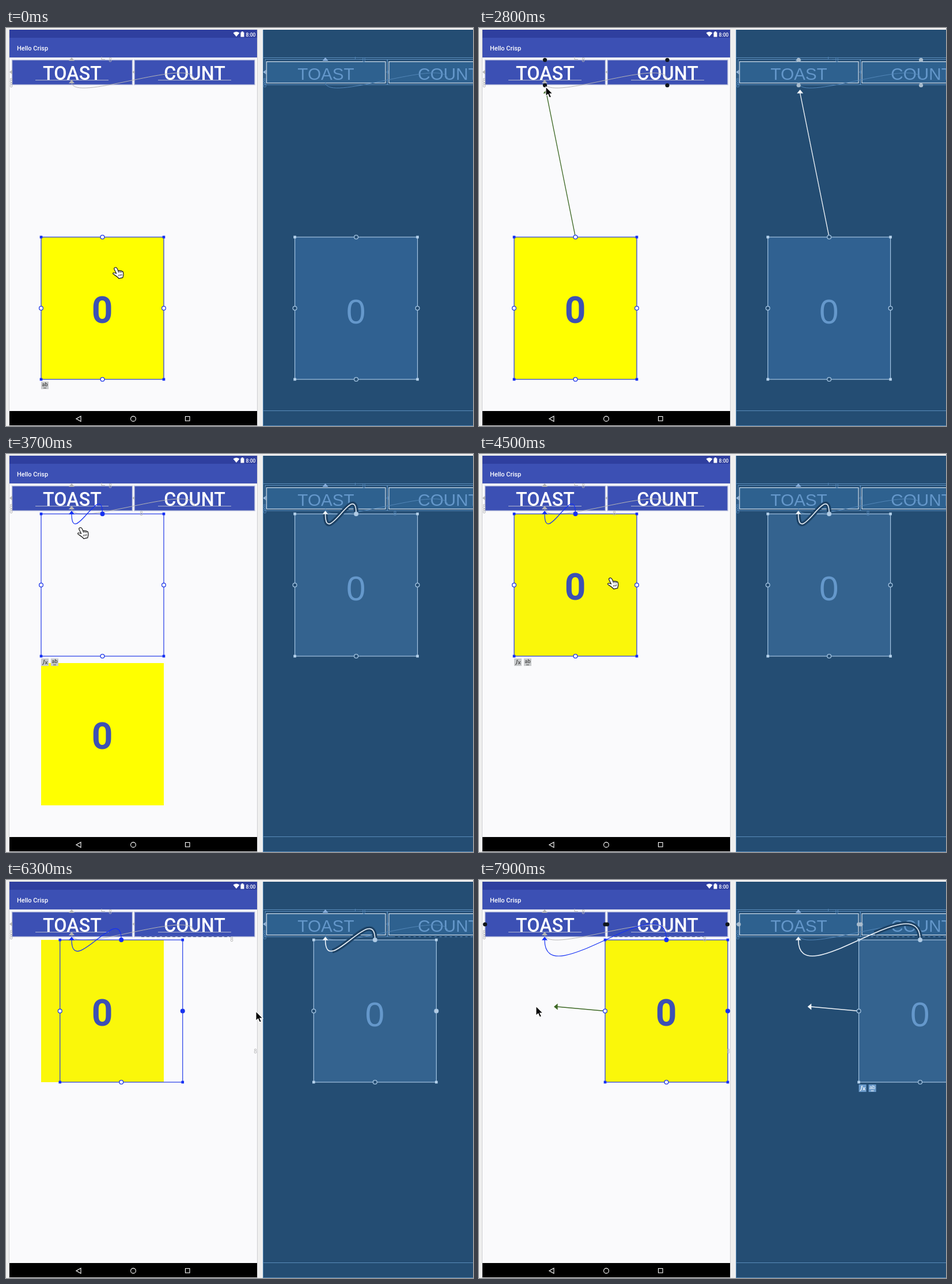
Recreate the animation shown at these times as an HTML page. Size 811x691 px, loop 8 s.

```html
<!DOCTYPE html>
<html lang="en">
<head>
<meta charset="utf-8">
<title>Layout editor</title>
<style>
html, body { margin: 0; width: 100%; height: 100%; overflow: hidden; background: #efefef; }
svg { display: block; width: 811px; height: 691px; }
text { font-family: Roboto, sans-serif; }
.bp text { font-family: "Liberation Sans", Arial, sans-serif; }
</style>
</head>
<body>
<svg id="stage" viewBox="0 0 811 691" xmlns="http://www.w3.org/2000/svg"></svg>
<script>
const LOOP = 8000, STEP = 100, W = 213, H = 247, SHIFT = 440.6;

const design = { line: '#2038e8', corner: '#1430f5', hollow: '#fff', solid: '#1430f5', link: '#1430f5',
  drag: '#3d6824', wire: '#b4b4b4', target: '#10161c', badge: '#c9cbcd', ink: '#4a4a4a' };
const blue = { bp: true, line: '#a3c4e2', corner: '#b5d2ec', hollow: '#244d73', solid: '#b4cbe2', link: '#eef4fa',
  drag: '#f2f6fa', wire: '#5286b8', target: '#a9bccd', badge: '#6a9aca', ink: '#fff' };

const rect = (x, y, w, h, fill, stroke = 'none', sw = 1) =>
  `<rect x="${x}" y="${y}" width="${w}" height="${h}" fill="${fill}" stroke="${stroke}" stroke-width="${sw}"/>`;
const path = (d, stroke, sw = 1, extra = '') =>
  `<path d="${d}" fill="none" stroke="${stroke}" stroke-width="${sw}" ${extra}/>`;
const dot = (x, y, r, fill, stroke = 'none', sw = 1.3) =>
  `<circle cx="${x}" cy="${y}" r="${r}" fill="${fill}" stroke="${stroke}" stroke-width="${sw}"/>`;
const label = (s, x, y, size, fill, weight = 400, anchor = 'middle') =>
  `<text x="${x}" y="${y}" font-size="${size}" fill="${fill}" font-weight="${weight}" text-anchor="${anchor}">${s}</text>`;
const tri = (x, y, turn, fill, s = 5.5) =>
  `<path d="M0 0L${s} ${s * 1.2}H${-s}Z" fill="${fill}" transform="translate(${x} ${y}) rotate(${turn})"/>`;

// Existing constraints of the two buttons
function wires(c) {
  const eight = (x, y) => label(8, x, y, 10, c.wire);
  return path('M327 90C327 48 114 132 114 94', c.wire) +
    path('M51 90.5H178M264 90.5H391', c.bp ? 'none' : '#b4b9cf') +
    tri(114, 51, 0, c.bp ? '#86addb' : c.wire, 5) + (c.bp ? '' : tri(114, 90, 0, c.wire, 5)) +
    tri(6, 76.5, -90, c.bp ? '#9bbce0' : c.wire, 4) + tri(219.5, 76.5, -90, c.wire, 3) +
    path('M166 50V55M166 54.5H172', c.wire) +
    eight(181, 59) + eight(9, 95) + eight(9, 103);
}

function designPanel() {
  const button = (x, s) => rect(x, 55.5, 209, 43, '#3c50b4', '#b9bfdc', 1.4) + label(s, x + 104.5, 90, 32.3, '#fff', 500);
  return rect(5.5, 3, 431, 688, '#fafafc', '#cfcfd2') +
    rect(6, 3, 430, 14, '#2f3f9f') + rect(6, 17, 430, 34, '#3c50b4') +
    path('M6 51.5H436', '#d6d8e6') +
    label('Hello Crisp', 19, 38.5, 11, '#fff', 500, 'start') +
    '<path d="M394.5 8.5Q400 4.500 405.500 8.500L400 15Z" fill="#fff"/>' +
    rect(407.5, 7.500, 6, 8, '#fff') + rect(409, 6, 3, 2, '#fff') +
    label('8:00', 416.5, 15, 8.6, '#fff', 500, 'start') +
    button(10.5, 'TOAST') + button(223, 'COUNT') +
    rect(6, 665, 430, 25, '#000') +
    path('M122 678.5L130 674V683Z', '#fff', 1.1) + dot(221, 678.5, 4.4, 'none', '#fff', 1.1) +
    rect(311.500, 674.500, 7.500, 7.500, 'none', '#fff', 1.1);
}

function bluePanel() {
  const button = (x, s) => rect(x - 2.5, 54.5, 212, 44, '#244d73', '#5c8fbf') +
    rect(x, 58.5, 206.5, 37, '#2e618f', '#d3e2ef', 1.2) + label(s, x + 103, 90, 29.7, '#6497ca');
  return rect(446, 3, 365, 688, '#244d73') +
    path('M446.500 3V690M446 51.500H811M446 664.500H811M446 690.500H811', '#5a8cba') +
    button(452.5, 'TOAST') + button(665, 'COUNT');
}

const hand = '<path d="M1 1C3 0 4.500 1.500 5.500 3.500L7 7C8 6 9.500 6 10 7C11 6 12.500 6.300 13 7.500C14 7 15.300 7.600 15.500 9L16 13C16 15 15 16 14.800 18.500L8 20C7 18 3 15.500 -2 12C-3 10.500 -1.500 9.500 0 10L3.500 11L0 4C-.6 2.500 -.2 1.500 1 1Z" fill="#fff" stroke="#222" stroke-width="1.300"/>' +
  path('M7 7L8 10M10 7L10.500 10M13 7.500V10M8 13V16M10.500 12.500V15.500M13 12V15', '#222', 1);
const pointer = '<path d="M0 0V16.500L3.800 13L6.500 19L9.500 17.700L6.800 12H12Z" fill="#050505" stroke="#fff" stroke-width="1.100"/>';

const track = [[500, 188, 415], [1300, 168, 364], [1900, 168, 363], [2000, 180, 343], [2100, 172, 219],
  [2400, 150, 165], [2700, 117, 107], [2800, 116, 102], [3300, 116, 102], [3700, 127, 127], [4000, 127, 130],
  [4900, 305, 282], [5100, 290, 235], [5300, 274, 228], [5400, 274, 228], [5700, 419, 228],
  [5800, 419, 226], [6000, 434, 228], [6300, 434, 228], [6800, 231, 230], [7200, 231, 230],
  [7300, 219, 227], [7500, 219, 227], [7800, 130, 220], [7900, 99, 219]];

function cursorAt(t) {
  const i = track.findIndex(k => k[0] > t);
  if (i === 0) return track[0].slice(1);
  if (i < 0) return track.at(-1).slice(1);
  const [a, x, y] = track[i - 1], [b, u, v] = track[i], p = (t - a) / (b - a);
  return [x + (u - x) * p, y + (v - y) * p];
}

const within = (t, a, b) => t >= a && t < b;
const ease = (t, start, dur) => {
  const p = Math.min(1, Math.max(0, (t - start) / dur));
  return p * p * (3 - 2 * p);
};

function dragAt(t) {
  if (within(t, 1900, 3300)) return { side: 'top', turn: 0, start: 1900 };
  if (within(t, 5400, 6200)) return { side: 'right', turn: 90, start: 5400 };
  if (t >= 7500) return { side: 'left', turn: -90, start: 7500 };
}

function badges(x, y, pair, c) {
  const ab = dx => rect(x + dx, y, 13, 13, c.badge) + label('ab', x + dx + 6.5, y + 8, 9, c.ink, 500) +
    path(`M${x + dx + 4} ${y + 11}H${x + dx + 9}`, c.ink);
  if (!pair) return ab(0);
  return rect(x, y, 13, 13, c.badge) +
    path(`M${x + 2} ${y + 11}Q${x + 5} ${y + 10} ${x + 5} ${y + 3}H${x + 7}M${x + 7} ${y + 5}l4 5m0 -5l-4 5`, c.ink, 1.2) + ab(17);
}

function targets(t, drag, c) {
  const early = t - drag.start < 300;
  const spots = drag.side === 'top' ? [[114.5, 55.5], [114.5, 99.5], [327, 55.5], [327, 99.5]]
    : [[10.5, 77], [219, 77], [222.500, 77], [431.500, 77]];
  return spots.map(([x, y], i) => {
    if (!early) return dot(x, y, 3.6, c.target);
    return dot(x, y, 3.3, i ? c.hollow : c.solid, c.line);
  }).join('');
}

function dragLine(from, t, drag, c) {
  const [x, y] = cursorAt(t - STEP), [hx, hy] = from;
  const near = Math.hypot(x - hx, y - hy) < 40;
  const a = drag.turn * Math.PI / 180, ex = x - 6 * Math.sin(a), ey = y + 6 * Math.cos(a);
  const d = near && drag.side === 'top'
    ? `M${hx} ${hy}C${hx} ${hy - 14} ${ex} ${ey + 14} ${ex} ${ey}` : `M${hx} ${hy}L${ex} ${ey}`;
  return path(d, c.drag, 1.3) + tri(x, y, drag.turn, c.drag);
}

function link(hx, hy, c) {
  const dx = hx - 114, k = 60 + (dx - 53) * 0.234;
  const d = `M${hx} ${hy}C${hx} ${hy - k} 114 ${104 + k} 114 104`;
  return (c.bp ? path(d, '#1d4265', 8, 'stroke-dasharray="100 999"') : '') +
    path(d, c.link, c.bp ? 1.6 : 1.2) + tri(114, 98.5, 0, c.link, 5);
}

// Selection frame with its handles, links and badges
function selection(t, x, y, c) {
  const mx = x + W / 2, my = y + H / 2, drag = dragAt(t), linked = t >= 3300, pinned = t >= 6200;
  const handles = { top: [mx, y], right: [x + W, my], bottom: [mx, y + H], left: [x, my] };
  const fixed = { top: linked, right: pinned };
  let s = rect(x, y, W, H, c.bp ? (linked ? '#34638f' : '#306191') : 'none', c.line, 1.2);
  if (c.bp) s += label(0, mx - 0.5, y + 150, 60, '#6598cb');
  if (linked) {
    s += link(mx, y, c) + label(8, pinned ? 392 : 235, 107, 10, c.wire);
  }
  if (pinned) {
    s += label(8, 433, 301, 10, c.wire) + path('M235 98.500H390', c.bp ? '#234a70' : '#46558f', 1, 'stroke-dasharray="5 4"');
  }
  if (drag) s += targets(t, drag, c) + dragLine(handles[drag.side], t, drag, c);
  for (const cx of [x, x + W]) for (const cy of [y, y + H]) s += rect(cx - 2.3, cy - 2.3, 4.600, 4.600, c.corner);
  for (const side in handles) {
    const hover = side === 'top' && within(t, 1200, 1900);
    s += dot(...handles[side], 3.4, fixed[side] ? c.solid : hover ? '#a9d18a' : c.hollow, c.line);
  }
  if (c.bp ? t >= 6500 : t < 2200) s += badges(x, y + H + 4, c.bp, c);
  else if (!c.bp && (within(t, 3500, 5400) || within(t, 6500, 7500))) s += badges(x, y + H + 4, true, c);
  return s;
}

const stage = document.getElementById('stage');
stage.innerHTML = `<defs><clipPath id="right"><path d="M${446 - SHIFT} 0H400V691H${446 - SHIFT}Z"/></clipPath></defs>
${designPanel()}<g class="bp">${bluePanel()}</g>
<g class="bp" transform="translate(${SHIFT})" clip-path="url(#right)">${wires(blue)}<g id="rightLive"></g></g>
<g id="leftLive"></g><g id="cursor"></g>`;
const [leftLive, rightLive, cursor] = ['leftLive', 'rightLive', 'cursor'].map(id => document.getElementById(id));

function render(t) {
  const x = 61 + 158 * ease(t, 6215, 290), y = 363 - 259 * ease(t, 3230, 310);
  // The rendered view catches up a moment after the frame has moved
  const vx = t < 7000 ? 61 : 219, vy = t < 3900 ? 363 : 104;
  leftLive.innerHTML = rect(vx, vy, W, H, t < 3900 ? '#ff0' : '#faf70a') +
    label(0, vx + W / 2 - 0.5, vy + 148.5, 64, '#3c50b4', 700) + wires(design) + selection(t, x, y, design);
  rightLive.innerHTML = selection(t, x, y, blue);
  const [cx, cy] = cursorAt(t);
  cursor.setAttribute('transform', `translate(${cx} ${cy})`);
  cursor.innerHTML = t < 1900 || within(t, 3400, 4800) ? hand : pointer;
}

const begin = performance.now();
let shown = -1;
function tick(now) {
  const t = Math.floor(Math.max(0, now - begin) % LOOP / STEP) * STEP;
  if (t !== shown) render(shown = t);
  requestAnimationFrame(tick);
}
render(0);
requestAnimationFrame(tick);
</script>
</body>
</html>
```
